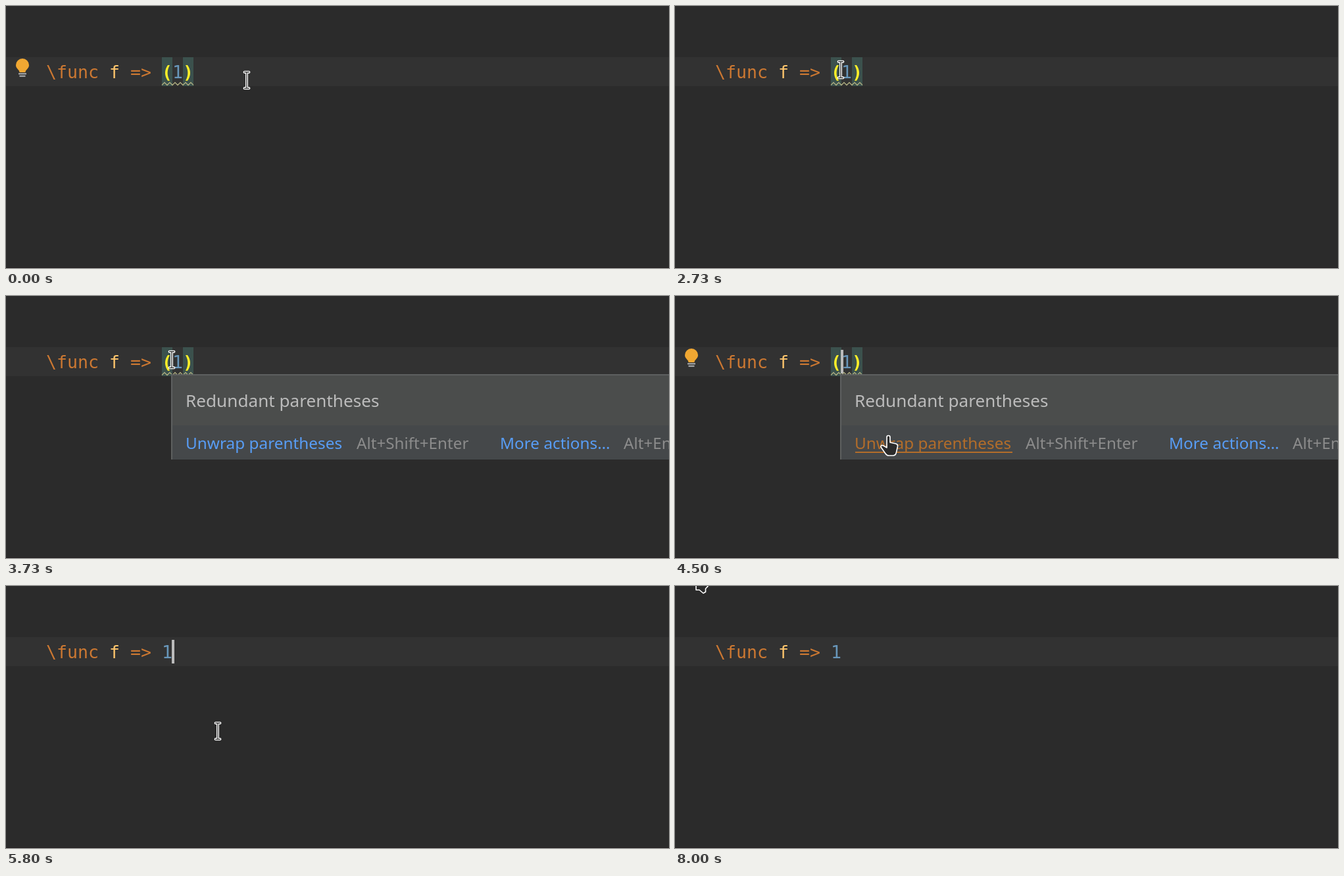
These frames come from a looping animation (1008 by 399 pixels, 8.06 s). An HTML page:

```html
<!DOCTYPE html>
<html lang="en">
<head>
<meta charset="utf-8">
<title>Unwrap parentheses</title>
<style>
  html, body { margin: 0; width: 100%; height: 100%; overflow: hidden; background: #2b2b2b; }
  svg { display: block; }
  .code { font: 26.56px "DejaVu Sans Mono", "Noto Sans Mono", monospace; }
  .key { fill: #cc7832; }
  .name { fill: #ffc66d; }
  .num { fill: #6897bb; }
  .paren { fill: #ffef28; font-weight: bold; }
  #popup { font: 24.2px "Noto Sans", "Open Sans", sans-serif; }
  .title { font-size: 26.15px; fill: #bbb; }
  .link { font-size: 24.35px; fill: #589df6; }
  .hint { fill: #8c8c8c; }
  .edge { fill: none; stroke: #5e6060; stroke-width: 2; }
  .hover .link { fill: #b36d2a; }
  #pointer { stroke-linejoin: round; stroke-linecap: round; }
  .shape { fill: #2b2b2b; stroke: #fff; stroke-width: 1.6; }
</style>
</head>
<body>
<svg width="1008" height="399" viewBox="0 0 1008 399">
  <rect width="1008" height="399" fill="#2b2b2b"/>
  <rect y="78" width="1008" height="44" fill="#323232"/>
  <rect y="398" width="1008" height="1" fill="#231f20"/>

  <g id="bulb">
    <path d="M20.500 101C20.500 97 15 95.500 15 90a10 10 0 0 1 20 0C35 95.500 29.500 97 29.500 101Z" fill="#f0a732"/>
    <path d="M19 103.200H31M20.500 106.800H29.500" stroke="#afb1b3" stroke-width="2"/>
  </g>

  <g class="code">
    <text x="61" y="110" class="key">\func</text>
    <text x="157" y="110" class="name">f</text>
    <text x="189" y="110" class="key">=&gt;</text>
    <g id="wrapped">
      <path d="M237 78h16v44h-16zM269 78h16v44h-16z" fill="#3b514d"/>
      <text x="237" y="110" class="paren">(</text>
      <text x="253" y="110" class="num">1</text>
      <text x="269" y="110" class="paren">)</text>
    </g>
    <text id="plain" x="237" y="110" class="num">1</text>
  </g>
  <path id="wave" fill="none" stroke="#aeae80" stroke-width="1.3"/>
  <rect id="caret" x="252" y="82" width="4" height="36" fill="#bbb"/>

  <g id="popup">
    <rect x="251" y="119" width="862" height="78" fill="#4b4d4c"/>
    <rect x="251" y="197" width="862" height="52" fill="#45484a"/>
    <path class="edge" d="M1113 120H252V249"/>
    <path id="base" class="edge" d="M251 250H1113"/>
    <text x="273" y="169" class="title">Redundant parentheses</text>
    <g id="action">
      <text x="273" y="233" class="link">Unwrap parentheses</text>
      <rect id="underline" x="274" y="237" width="239" height="2" fill="#b36d2a"/>
    </g>
    <text x="533" y="233" class="hint">Alt+Shift+Enter</text>
    <text x="751" y="233" class="link">More actions…</text>
    <text x="939" y="233" class="hint">Alt+Enter</text>
  </g>

  <g id="pointer">
    <g id="beam" fill="none">
      <path d="M-3.400-12.300H3.400M0-12.300V12.300M-3.400 12.300H3.400" stroke="#fff" stroke-width="4"/>
      <path d="M-3.400-12.300H3.400M0-12.300V12.300M-3.400 12.300H3.400" stroke="#2b2b2b" stroke-width="1.3"/>
    </g>
    <path id="arrow" class="shape" d="M0 0V24H5L11 29 14.500 27V22L18 18.500Z"/>
    <path id="hand" class="shape" d="M-2 15V2a2.500 2.500 0 0 1 5 0V10L12 12q3 1 2.500 4l-2 9q-1 5-5 5H1q-3 0-5-3L-11 17q0-4 4-2l5 3z"/>
  </g>
</svg>
<script>
const LOOP = 8060, FRAME = 1000 / 30;
const $ = id => document.getElementById(id);
const clamp = v => Math.min(1, Math.max(0, v));
const show = (id, on) => $(id).style.display = on ? '' : 'none';
const within = (t, ...spans) => spans.some(([a, b]) => t >= a && t < b);

// Pointer hotspot: time, x, y
const path = [
  [0, 366, 113], [400, 366, 113], [1030, 249, 98], [1170, 252, 97],
  [3840, 252, 97], [4630, 330, 222], [4870, 330, 222], [4870, 322, 221],
  [6970, 322, 221], [7070, 319, 229], [7470, 2, 4], [7630, 32, -18], [LOOP, 32, -18]
];

function pointerAt(t) {
  const next = path.findIndex(p => p[0] > t);
  const [t0, x0, y0] = path[next - 1], [t1, x1, y1] = path[next];
  const k = (t - t0) / (t1 - t0), e = k * k * (3 - 2 * k);
  return [x0 + (x1 - x0) * e, y0 + (y1 - y0) * e];
}

function draw(t) {
  // The screen updates thirty times a second
  const q = Math.floor((t + 4) / FRAME) * FRAME;
  const [x, y] = pointerAt(q);
  const unwrapped = t >= 5570;

  show('bulb', within(t, [0, 1770], [2900, 3100], [4200, 5570]));
  // Half-second blink, restarted by clicks
  show('caret', within(t, [1770, 2730], [3230, 3730], [4230, 4700], [5570, 7000], [7500, 8000]));
  show('wrapped', !unwrapped);
  show('plain', unwrapped);
  show('wave', t < 5800);
  $('wave').setAttribute('d', 'M237 120.5' + 'l4-4 4 4'.repeat(unwrapped ? 2 : 6));

  const open = 1 - (1 - clamp((q - 3101) / 199)) ** 3;
  const p = Math.min(open, clamp((5630 - q) / 130));
  const popup = $('popup');
  popup.setAttribute('opacity', p);
  popup.setAttribute('transform', `translate(671 184) scale(${0.8 + 0.2 * p}) translate(-671 -184)`);
  show('base', t >= 5430);

  const overPopup = within(t, [3840, 5430]) && y > 119;
  const hover = within(t, [3840, 5630]) && y > 205;
  $('action').setAttribute('class', hover ? 'hover' : '');
  show('underline', hover);

  const kind = overPopup ? (hover ? 'hand' : 'arrow') : y < 30 ? 'arrow' : 'beam';
  for (const id of ['beam', 'arrow', 'hand']) show(id, id === kind);
  $('pointer').setAttribute('transform', `translate(${Math.round(x)} ${Math.round(y)})`);
}

const start = performance.now();
function tick() {
  draw((performance.now() - start) % LOOP);
  requestAnimationFrame(tick);
}
tick();
</script>
</body>
</html>
```
